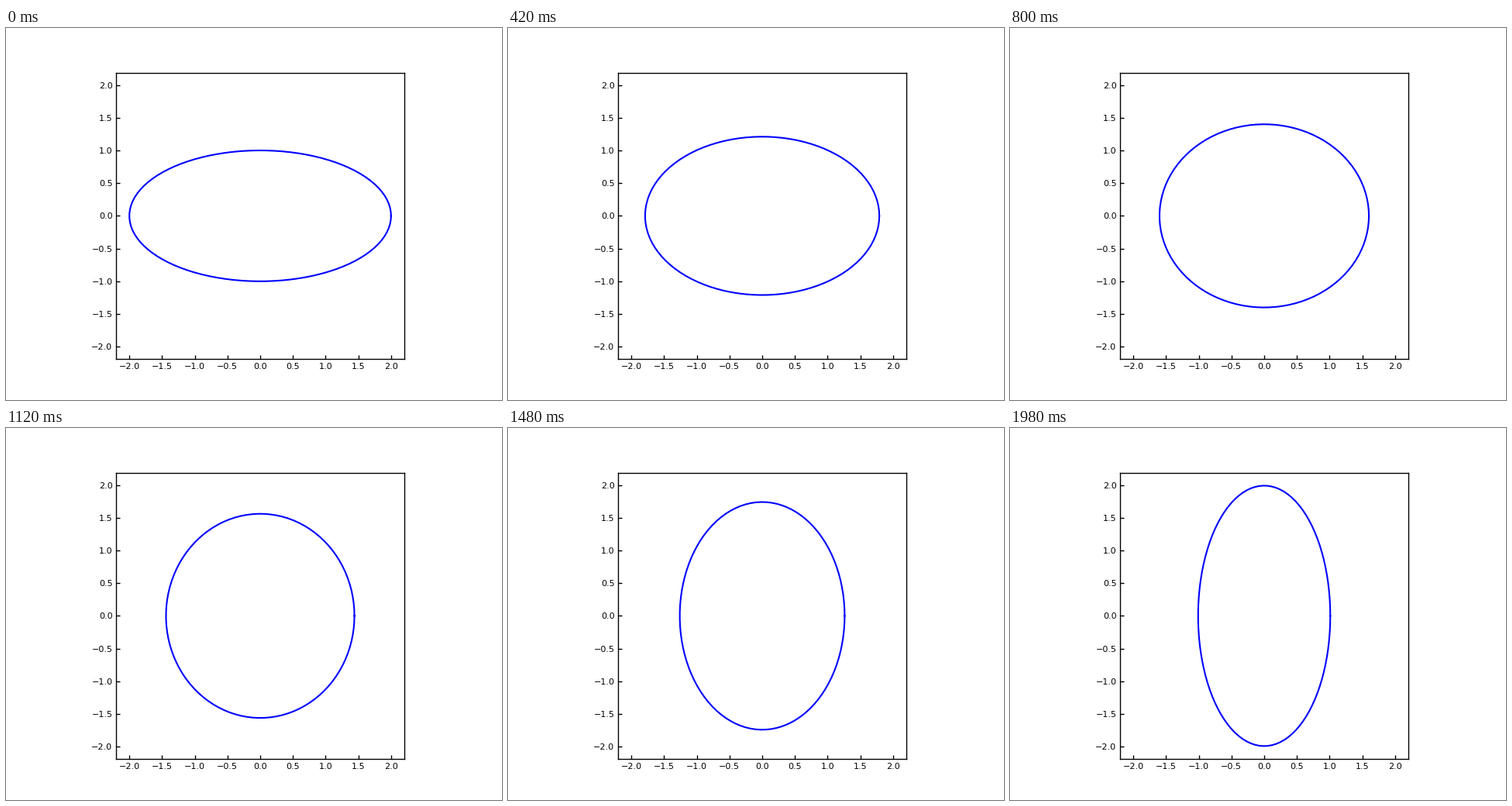
Animation of 640 by 480 pixels, one loop 2 s. Source, as a matplotlib script:

```python
import numpy as np
import matplotlib.pyplot as plt
from matplotlib.animation import FuncAnimation

FRAMES = 100

plt.rcParams["font.family"] = "DejaVu Sans"

fig, ax = plt.subplots(figsize=(6.4, 4.8), dpi=100)
ax.set_aspect("equal")
ax.set_xlim(-2.2, 2.2)
ax.set_ylim(-2.189, 2.189)
ticks = np.arange(-2, 2.5, 0.5)
ax.set_xticks(ticks)
ax.set_yticks(ticks)
ax.tick_params(direction="in", labelsize=8, width=1)
for spine in ax.spines.values():
    spine.set_linewidth(1)

theta = np.linspace(0, 2 * np.pi, 100)
curve, = ax.plot([], [], color="blue", lw=1.5)


def update(i):
    s = i / FRAMES
    curve.set_data((2 - s) * np.cos(theta), (1 + s) * np.sin(theta))
    return curve,


anim = FuncAnimation(fig, update, frames=FRAMES, interval=20,
                     repeat=True, repeat_delay=0)
plt.show()
```
